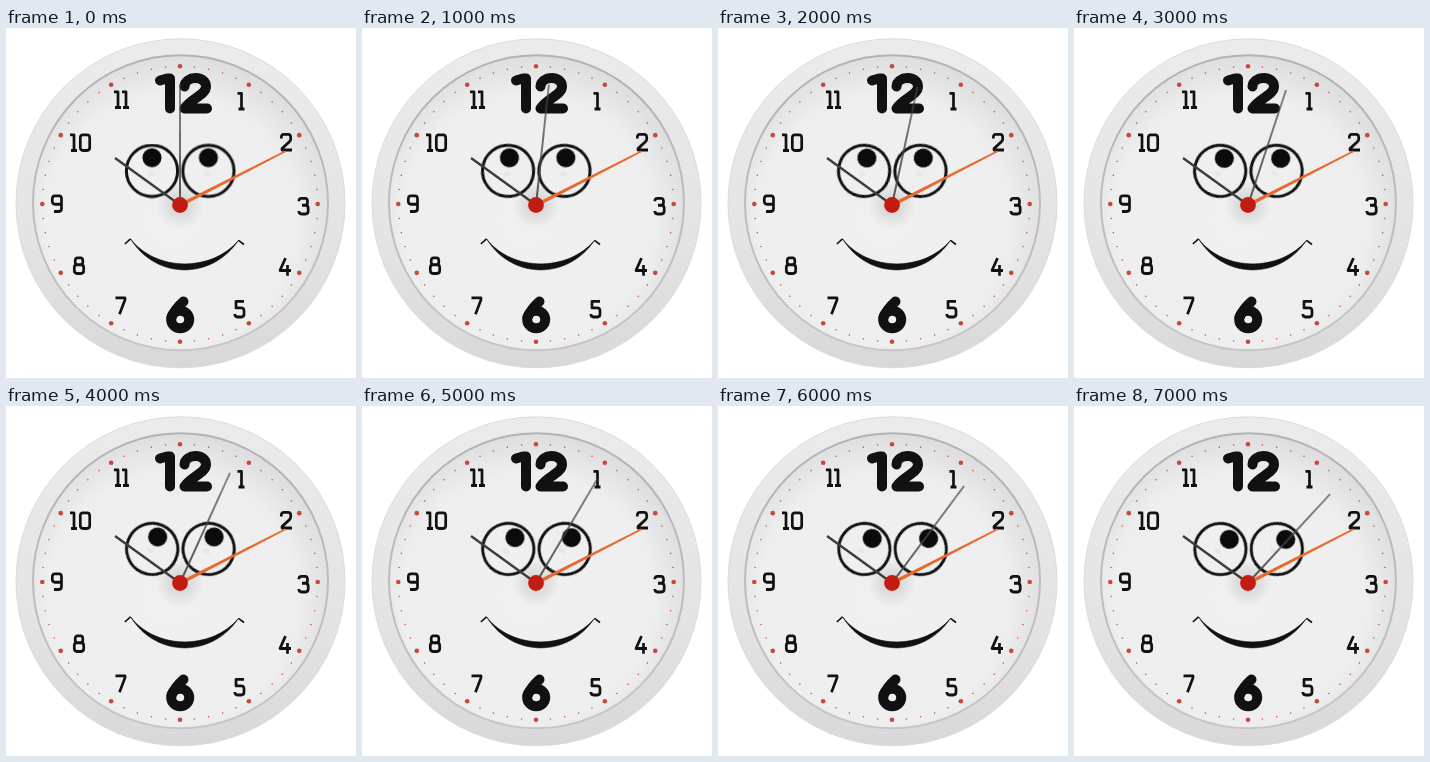
These frames come from a looping animation (350 px wide and 350 px high, 8000 ms). An HTML page:

```html
<!DOCTYPE html>
<html lang="en">
<head>
<meta charset="utf-8">
<title>Smiling clock</title>
<style>
  html, body { margin: 0; width: 100%; height: 100%; overflow: hidden; background: #fff; }
  svg { display: block; width: 100vw; height: 100vh; }
  /* One jump of 1/59 turn per second */
  .tick { transform-origin: 0 0; animation: tick 8s steps(8, end) infinite; }
  @keyframes tick { from { transform: rotate(0deg); } to { transform: rotate(48.8deg); } }
  .thin, .bold { fill: none; stroke: #111; stroke-linejoin: round; }
  .thin { stroke-width: 2.7; }
  .bold { stroke-width: 10; stroke-linecap: round; }
</style>
</head>
<body>
<svg viewBox="0 0 350 350" role="img" aria-label="Clock with a smiling face">
  <defs>
    <linearGradient id="rim" x1="0" y1="0" x2="0" y2="1">
      <stop offset="0" stop-color="#ebebeb"/>
      <stop offset=".6" stop-color="#e5e4e5"/>
      <stop offset="1" stop-color="#d9d7d8"/>
    </linearGradient>
    <linearGradient id="edge" x1="0" y1="0" x2="0" y2="1">
      <stop offset="0" stop-color="#b3b1b3"/>
      <stop offset="1" stop-color="#c6c4c5"/>
    </linearGradient>
    <radialGradient id="face" cx=".47" cy=".56" r=".57">
      <stop offset="0" stop-color="#f0f0f1"/>
      <stop offset=".75" stop-color="#eeeeef"/>
      <stop offset="1" stop-color="#dcdbdd"/>
    </radialGradient>
    <radialGradient id="shade">
      <stop offset=".3" stop-opacity=".1"/>
      <stop offset="1" stop-opacity="0"/>
    </radialGradient>
    <g id="eye">
      <circle cy="-.6" r="25.6" fill="#efeff0" stroke="#111" stroke-width="3"/>
      <circle cy="-13.8" r="9.5" fill="#0b0b0b"/>
      <ellipse cx="-1" cy="2.5" rx="4" ry="2.5" fill="#e7e7e9"/>
    </g>
  </defs>

  <circle cx="174.5" cy="175.3" r="164.5" fill="url(#rim)" stroke="#dcdcdd"/>
  <circle cx="174.5" cy="174.8" r="147.5" fill="url(#face)" stroke="url(#edge)" stroke-width="2"/>

  <g id="dots" fill="#cb463c"></g>
  <g id="digits" class="thin"></g>

  <g class="bold">
    <path d="M154 52.5L161 50.5H164V80.5"/>
    <path d="M178.5 58.5C179 47.5 200 47 200 58.5C200 67 184 71 178.5 80.5H201"/>
    <ellipse cx="174.2" cy="291.5" rx="9" ry="8.8"/>
    <path d="M177.5 273.5Q169 281 165.6 289"/>
  </g>

  <path d="M124.5 210.8C150 252 206 252 232.5 212.3C206 244 150 244 124.5 210.8Z" fill="#111" stroke="#111" stroke-width=".6"/>
  <path d="M118.8 216L124.5 210.8M232.5 212.3L238 216.5" fill="none" stroke="#111" stroke-width="1.6"/>

  <circle cx="174" cy="177" r="24" fill="url(#shade)"/>
  <g transform="translate(146 143.5)"><use href="#eye" class="tick"/></g>
  <g transform="translate(202.4 143.5)"><use href="#eye" class="tick"/></g>

  <path d="M174 177L109 130" stroke="#3c3c3e" stroke-width="2.4"/>
  <path d="M173.4 175.6L279 122.4L279.8 124L174.9 178.7Z" fill="#e66a30"/>
  <g transform="translate(174 177)">
    <path class="tick" d="M-.9 0L-.6 -121H.6L.9 0Z" fill="#444"/>
  </g>
  <circle cx="174" cy="177" r="7.9" fill="#c21b11"/>
</svg>
<script>
  const NS = "http://www.w3.org/2000/svg";

  function add(parent, tag, attrs) {
    const el = document.createElementNS(NS, tag);
    for (const key in attrs) el.setAttribute(key, attrs[key]);
    document.getElementById(parent).append(el);
  }

  for (let i = 0; i < 60; i++) {
    const a = i * Math.PI / 30;
    add("dots", "circle", {
      cx: 174 + 137.7 * Math.sin(a),
      cy: 176 - 137.7 * Math.cos(a),
      r: i % 5 ? 0.75 : 2.3
    });
  }

  // Numeral strokes in a 12 by 17 box
  const glyphs = {
    0: "M4 1.3H8Q10.7 1.3 10.7 4V13Q10.7 15.7 8 15.7H4Q1.3 15.7 1.3 13V4Q1.3 1.3 4 1.3Z",
    1: "M1.5 1.3H5.5V15.7M2.5 15.7H8.5",
    2: "M1.3 5V4Q1.3 1.3 4 1.3H8Q10.7 1.3 10.7 4V5.5Q10.7 7 9.5 8L2 14.5V15.7H12",
    3: "M1.3 4Q1.3 1.3 4 1.3H7.5Q10 1.3 10 4V5Q10 7.6 7.5 7.6H4.5M7.5 7.6Q10.7 7.6 10.7 10.3V13Q10.7 15.7 8 15.7H4Q1.3 15.7 1.3 13",
    4: "M7 .5L1.5 12H12.5M9 7V17",
    5: "M10.5 1.3H2.5V7.3H7.5Q10.5 7.3 10.5 10V13Q10.5 15.7 8 15.7H4Q1.3 15.7 1.3 13",
    7: "M1 1.3H10.5V3L5 16.5",
    8: "M4.5 1.3H7.5Q9.8 1.3 9.8 4V5Q9.8 7.6 7.5 7.6H4.5Q2.2 7.6 2.2 5V4Q2.2 1.3 4.5 1.3ZM4 7.6H8Q10.7 7.6 10.7 10.3V13Q10.7 15.7 8 15.7H4Q1.3 15.7 1.3 13V10.3Q1.3 7.6 4 7.6Z",
    9: "M10.5 9H4Q1.3 9 1.3 6.5V4Q1.3 1.3 4 1.3H8Q10.5 1.3 10.5 4V13Q10.5 15.7 8 15.7H3"
  };

  const places = [
    [1, 230, 64], [2, 274, 105], [3, 291.5, 169], [4, 272.5, 229.5],
    [5, 227.5, 272], [7, 108.5, 268.5], [8, 67, 228.5], [9, 45, 166.5],
    [1, 62.5, 105.5], [0, 73, 105.5], [1, 106.5, 62.5], [1, 114.5, 62.5]
  ];
  for (const [n, x, y] of places)
    add("digits", "path", { d: glyphs[n], transform: `translate(${x} ${y}) scale(1 1.08)` });
</script>
</body>
</html>
```
